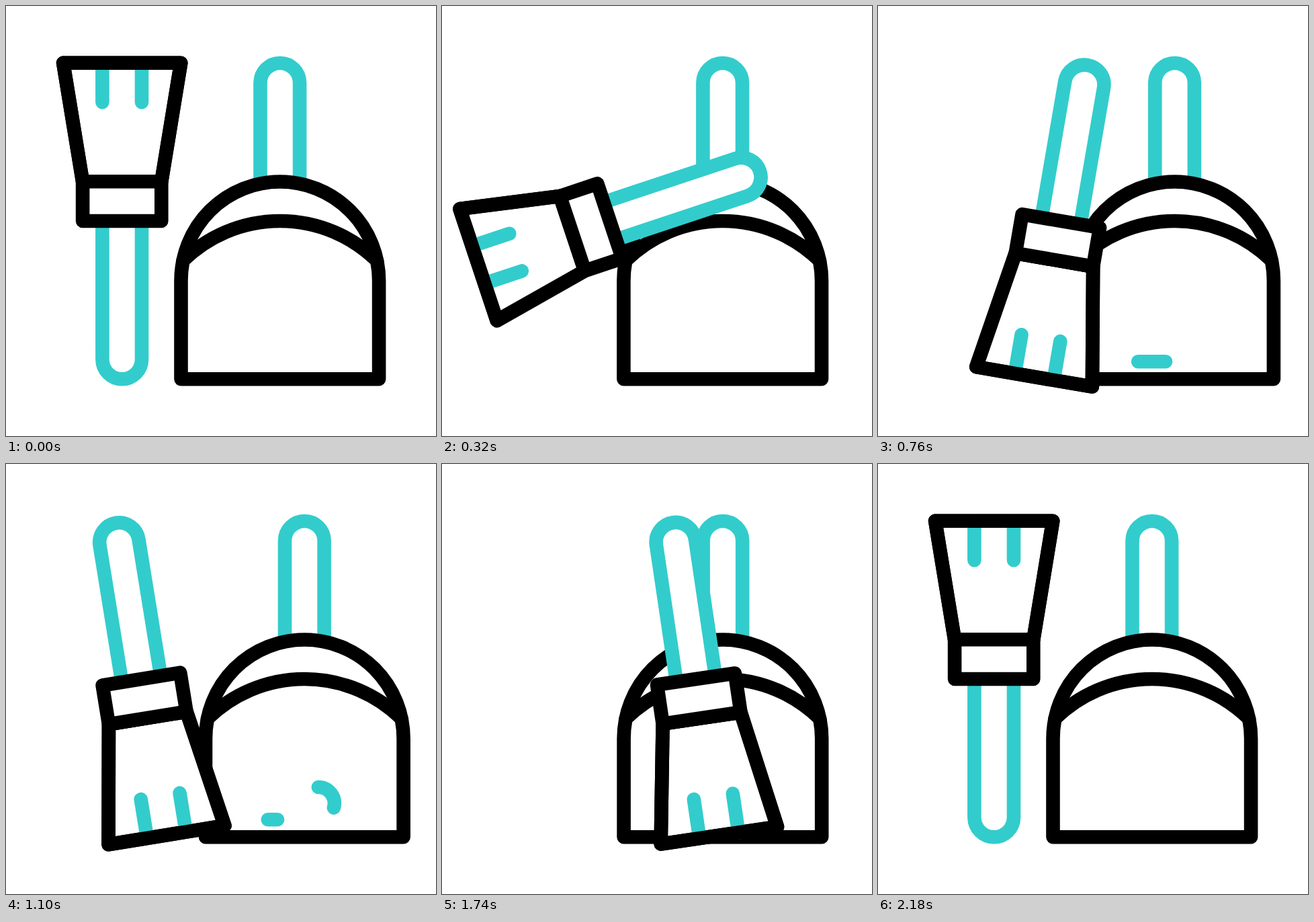
Recreate the animation shown at these times as an HTML page. Size 640x640 px, loop 2.4 s.

```html
<!DOCTYPE html>
<html lang="en">
<head>
<meta charset="utf-8">
<title>Broom and dustpan</title>
<style>
  html, body { margin: 0; width: 100%; height: 100%; overflow: hidden; background: #fff; }
  svg { display: block; width: 100vw; height: 100vh; }
  path { fill: none; stroke: #000; stroke-width: 20.6; stroke-linecap: round; stroke-linejoin: round; }
  .teal { stroke: #3cc; }
  .solid { fill: #fff; }
</style>
</head>
<body>
<svg viewBox="0 0 640 640">
  <g id="pan">
    <path class="teal" d="M-29.3 262V114.3a29.3 29.3 0 0 1 58.6 0V262"/>
    <path class="solid" d="M-147.3 555.2V408.8a147.3 147.3 0 0 1 294.6 0V555.2Z"/>
    <path d="M-144.3 379A206 206 0 0 1 144.3 379"/>
    <path class="teal" id="dash"/>
    <path class="teal" id="curl"/>
  </g>
  <g id="broom">
    <path class="teal solid" d="M-29.3 0V206a29.3 29.3 0 0 0 58.6 0V0"/>
    <path class="solid" id="head"/>
    <path class="teal" id="bristles"/>
    <path id="rim"/>
    <path class="solid" d="M-58.6 -58.7H58.6V0H-58.6Z"/>
  </g>
</svg>
<script>
const LOOP = 2400;
const $ = id => document.getElementById(id);
const setPath = (id, d) => $(id).setAttribute('d', d);

// Swing down, rock back, rock forward, sweep, swing up.
const moves = [
  { from: 0, to: 530, dx: 117.5, turn: -165.2 },
  { from: 675, to: 1005, dx: -106.2, turn: -30.1 },
  { from: 1005, to: 1322, dx: 79.3, turn: 27.8 },
  { from: 1322, to: 1740, dx: 114.7, turn: -20.9 },
  { from: 1740, to: 2180, dx: -205.3, turn: 188.4 }
];

// Eased 0 to 1 between two times.
function ramp(t, from, to) {
  const s = Math.min(1, Math.max(0, (t - from) / (to - from)));
  return s * s * (3 - 2 * s);
}

// Rises from a to b, holds, falls from c to d.
const hump = (t, a, b, c, d) => ramp(t, a, b) - ramp(t, c, d);

function drawPan(t) {
  const x = 407.8 + 38 * hump(t, 0, 960, 960, 2140);
  $('pan').setAttribute('transform', `translate(${x} 0)`);

  const length = 41 * hump(t, 600, 750, 860, 1260);
  setPath('dash', length > 0 ? `M-54.5 529.3h${length}` : '');

  const angle = 1.85 * hump(t, 860, 1100, 1160, 1380);
  const endX = 20.5 + 24 * Math.sin(angle), endY = 505 - 24 * Math.cos(angle);
  setPath('curl', angle > 0 ? `M20.5 481A24 24 0 0 1 ${endX} ${endY}` : '');
}

function drawBroom(t) {
  let x = 172.7, turn = 0;
  for (const move of moves) {
    const part = ramp(t, move.from, move.to);
    x += move.dx * part;
    turn += move.turn * part;
  }
  $('broom').setAttribute('transform', `translate(${x} 320) rotate(${turn})`);

  // The head shortens during both swings.
  const squash = hump(t, 0, 260, 460, 600) + hump(t, 1740, 1900, 2020, 2180);
  const top = -235.3 + 29 * squash;
  const outline = `M-87.6 ${top}H87.6L58.6 -58.7H-58.6Z`;
  setPath('head', outline);
  setPath('rim', outline);
  setPath('bristles', `M-29.3 ${top}v58.6M29.3 ${top}v58.6`);
}

function frame(now) {
  const t = now % LOOP;
  drawPan(t);
  drawBroom(t);
  requestAnimationFrame(frame);
}
frame(0);
</script>
</body>
</html>
```
